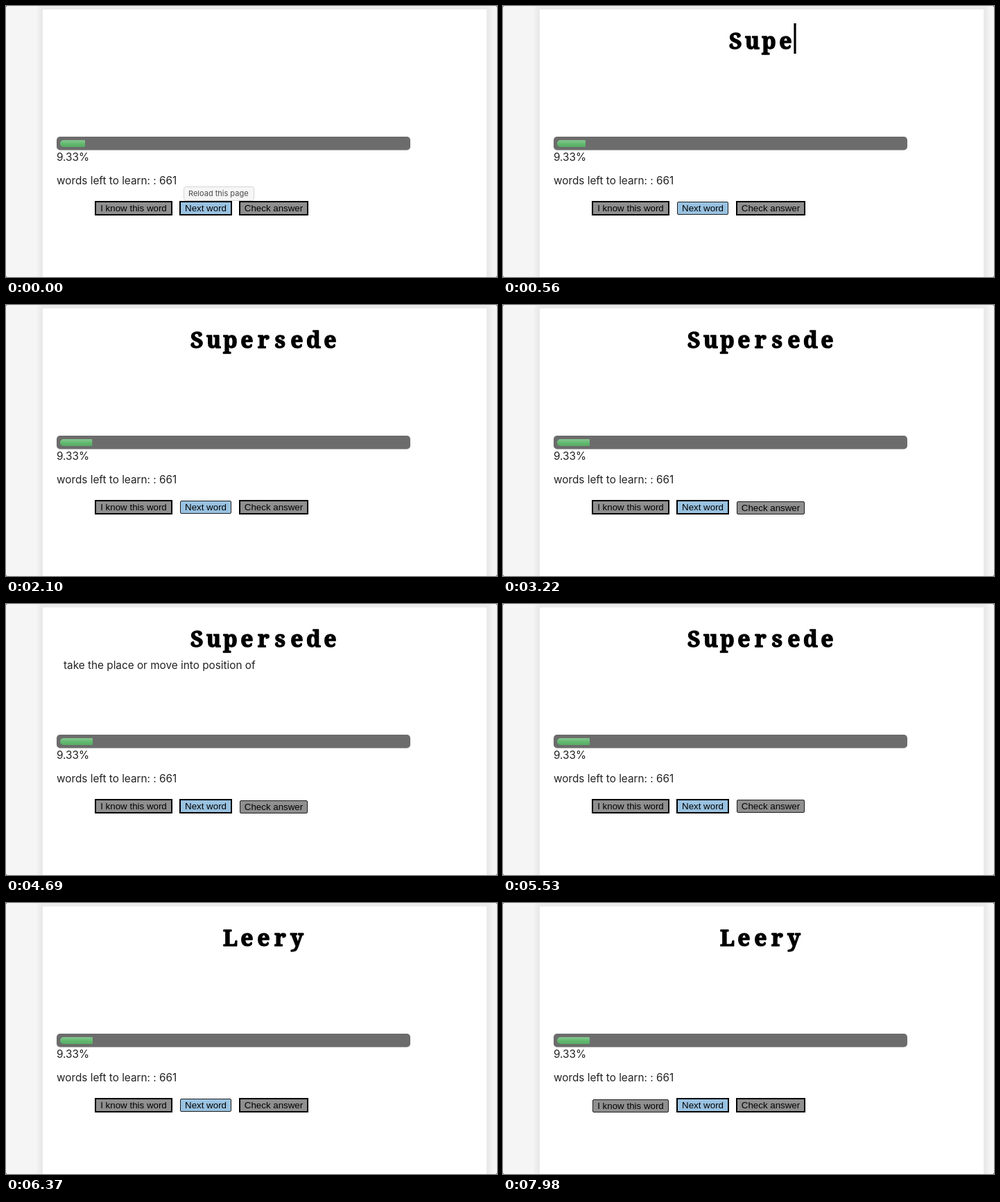
Write an HTML page that moves like this. It is 708 px wide and 392 px high and loops after 8 s.

```html
<!DOCTYPE html>
<html lang="en">
<head>
<meta charset="utf-8">
<title>Word trainer</title>
<style>
  html, body { margin: 0; width: 100%; height: 100%; overflow: hidden; background: #444; }
  .stage {
    position: absolute; left: 0; top: 0; width: 708px; height: 392px;
    overflow: hidden; background: #f5f5f5; border-radius: 2px;
  }
  .card {
    position: absolute; left: 53px; top: 5px; width: 640px; height: 420px;
    background: #fff; box-shadow: 0 0 6px 6px rgba(0, 0, 0, .05);
  }
  svg { position: absolute; left: 0; top: 0; display: block; }
  .copy { font: 15.32px Inter, sans-serif; fill: #222; }
  .word {
    font: 600 32px "Noto Serif", serif; text-anchor: middle;
    stroke: #000; stroke-width: 1.4; stroke-linejoin: round;
  }
  .button text { font: 13.333px "Liberation Sans", Arial, sans-serif; text-anchor: middle; }
  .tip rect { fill: #f6f6f6; stroke: #d6d6d6; }
  .tip text { font: 11px Inter, sans-serif; fill: #4a4a4a; }
</style>
</head>
<body>
<div class="stage">
<div class="card"></div>
<svg width="708" height="392" viewBox="0 0 708 392">
  <defs>
    <linearGradient id="green" x2="0" y2="1">
      <stop offset="0" stop-color="#86c690"/>
      <stop offset=".6" stop-color="#5fb86c"/>
      <stop offset="1" stop-color="#58aa65"/>
    </linearGradient>
  </defs>
  <text class="word" id="word" y="61.5"></text>
  <rect id="caret" y="25" width="3.2" height="44"/>
  <text class="copy" id="meaning" x="83" y="94">take the place or move into position of</text>
  <rect x="73" y="189" width="510" height="19.5" rx="5" fill="#6c6c6c"/>
  <path id="fill" fill="url(#green)"/>
  <text class="copy" x="73" y="224">9.33%</text>
  <text class="copy" x="73" y="258">words left to learn: : 661</text>
  <g id="buttons"></g>
  <g class="tip" id="tip">
    <rect x="256.5" y="261.5" width="101" height="20" rx="3"/>
    <text x="263" y="275">Reload this page</text>
  </g>
</svg>
</div>
<script>
const LOOP = 8000, CENTER = 373, CELL = 24, CARET = 3.2, TYPE_MS = 66;
const $ = id => document.getElementById(id);

// Typing runs: caret shows at `start`, first letter lands at `type`, cleared at `end`.
const runs = [
  { text: 'Supersede', start: 100, type: 300, end: 5805 },
  { text: 'Leery', start: 5875, type: 6085, end: LOOP }
];
// [time, hovered button]
const hovers = [[0, -1], [275, 1], [3145, 2], [5665, 1], [7905, 0]];
// [down, up] of each mouse press
const presses = [[3215, 3285], [4685, 4755], [5665, 5805], [7975, LOOP]];
// [time, right edge of the progress fill]
const progress = [[0, 114], [560, 119], [840, 120], [1400, 122.4], [1750, 123.5], [2450, 125]];

const within = (t, a, b) => t >= a && t < b;

function lerpTable(table, t) {
  const i = table.findIndex(([at]) => at > t);
  if (i < 0) return table[table.length - 1][1];
  const [t0, a] = table[i - 1], [t1, b] = table[i];
  return a + (b - a) * (t - t0) / (t1 - t0);
}

function make(tag, parent, attrs) {
  const el = document.createElementNS('http://www.w3.org/2000/svg', tag);
  set(el, attrs);
  return parent.appendChild(el);
}

function set(el, attrs) {
  for (const key in attrs) el.setAttribute(key, attrs[key]);
}

const buttons = [
  ['I know this word', 128, 112, '#8f8f8f'],
  ['Next word', 250, 76, '#99c2e1'],
  ['Check answer', 336, 100, '#8f8f8f']
].map(([label, x, w, fill]) => {
  const group = make('g', $('buttons'), { class: 'button' });
  const box = make('rect', group, { fill });
  make('text', group, { x: x + w / 2, y: 297 }).textContent = label;
  return { group, box, x, w };
});

function drawButton({ group, box, x, w }, hover, down) {
  const inset = hover ? 1.5 : 1;
  set(box, {
    x: x + inset, y: 282 + inset, width: w - 2 * inset, height: 21 - 2 * inset,
    rx: hover ? 1.5 : 0, stroke: hover ? '#1c1c1c' : '#000', 'stroke-width': hover ? 1 : 2
  });
  set(group, { transform: `translate(0 ${down ? 1 : 0})` });
}

function drawWord(t) {
  const run = runs.find(r => within(t, r.start, r.end));
  const count = run ? Math.max(0, Math.min(run.text.length, Math.floor((t - run.type) / TYPE_MS) + 1)) : 0;
  const text = run ? run.text.slice(0, count) : '';
  const left = CENTER - (CELL * count + CARET) / 2;
  $('word').textContent = text;
  set($('word'), { x: [...text].map((_, i) => left + CELL * (i + .5)).join(' ') });
  set($('caret'), { x: left + CELL * count, opacity: run && count < run.text.length ? 1 : 0 });
}

function render(t) {
  drawWord(t);
  set($('meaning'), { opacity: within(t, 3285, 4755) ? 1 : 0 });
  set($('tip'), { opacity: Math.max(0, Math.min(1, (270 - t) / 210)) });
  const edge = lerpTable(progress, t);
  set($('fill'), { d: `M83 194H${edge - 1}q1 0 1 1v8q0 1-1 1H83a5 5 0 0 1 0-10z` });
  const hovered = hovers.filter(([at]) => at <= t).pop()[1];
  const down = presses.some(([a, b]) => within(t, a, b));
  buttons.forEach((b, i) => drawButton(b, i === hovered, i === hovered && down));
}

const origin = performance.now();
function tick() {
  render((performance.now() - origin) % LOOP);
  requestAnimationFrame(tick);
}
tick();
</script>
</body>
</html>
```
